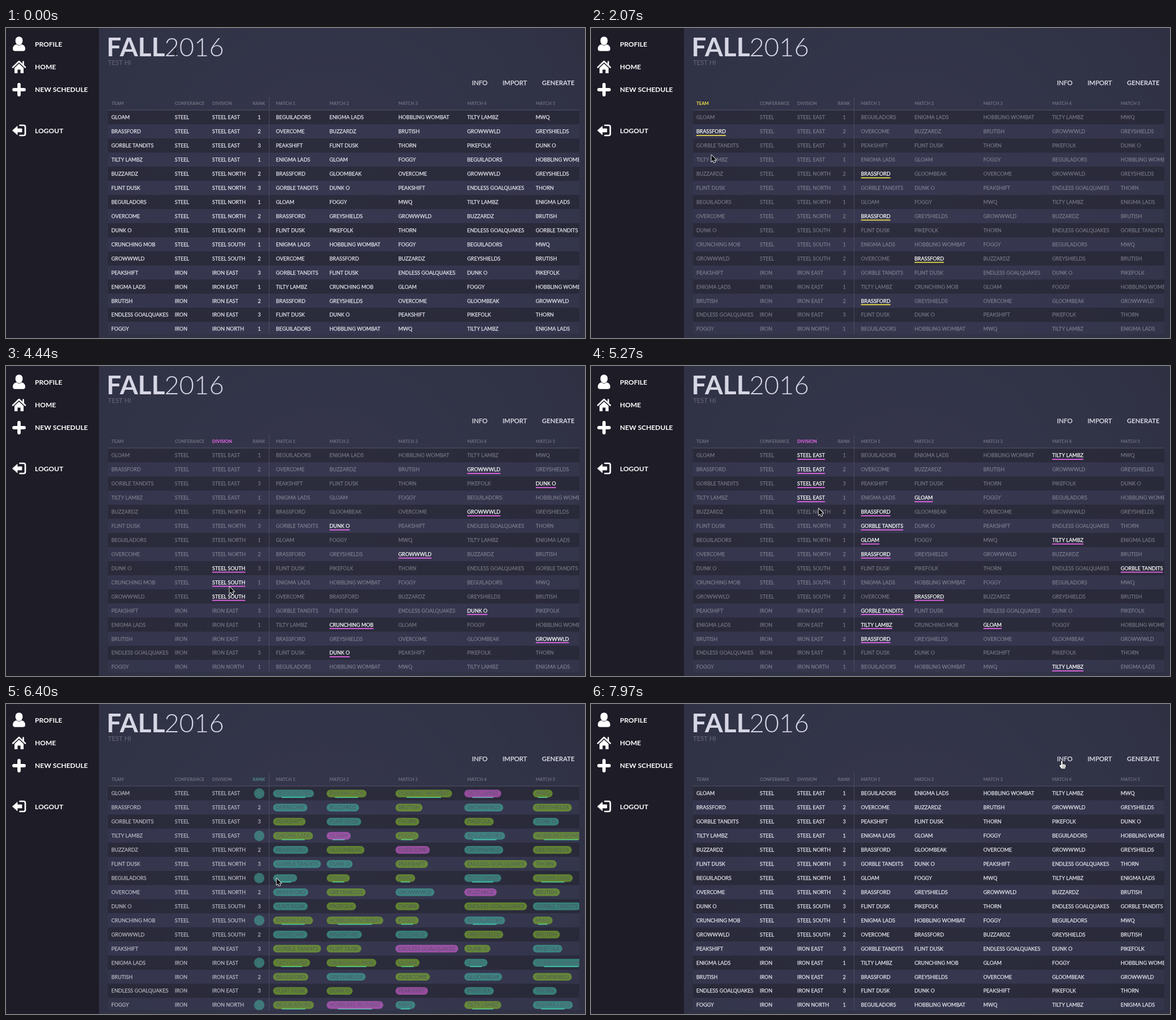
An HTML page with a canvas that plays this animation: 1022 px wide and 548 px high, repeating every 8000 ms.

```html
<!DOCTYPE html>
<html lang="en">
<head>
<meta charset="utf-8">
<title>Season schedule</title>
<style>
html, body { margin: 0; width: 100%; height: 100%; overflow: hidden; background: #2f3043; }
canvas { display: block; width: 1022px; height: 548px; }
</style>
</head>
<body>
<canvas id="stage" width="1022" height="548"></canvas>
<script>
const ctx = document.getElementById('stage').getContext('2d');
const LOOP = 8000, TOP = 158, ROW = 24.93, RIGHT = 1012, BOTTOM = 541;
const INK = '#e4e4ed', DARK = '#303145', DIM = 0.34;
const COLORS = { team: '#efe24e', conf: '#92d22f', div: '#ee68ee', rank: '#47c9b0' };
const PILLS = { division: '#f069ee', conference: '#45c5ae', outside: '#8fcb2c' };
const MATCH_X = [476.5, 571, 692.5, 814, 935];

// name, conference, division, rank, five opponents
const rows = `
GLOAM,STEEL,EAST,1,BEGUILADORS,ENIGMA LADS,HOBBLING WOMBAT,TILTY LAMBZ,MWQ
BRASSFORD,STEEL,EAST,2,OVERCOME,BUZZARDZ,BRUTISH,GROWWWLD,GREYSHIELDS
GORBLE TANDITS,STEEL,EAST,3,PEAKSHIFT,FLINT DUSK,THORN,PIKEFOLK,DUNK O
TILTY LAMBZ,STEEL,EAST,1,ENIGMA LADS,GLOAM,FOGGY,BEGUILADORS,HOBBLING WOMBAT
BUZZARDZ,STEEL,NORTH,2,BRASSFORD,GLOOMBEAK,OVERCOME,GROWWWLD,GREYSHIELDS
FLINT DUSK,STEEL,NORTH,3,GORBLE TANDITS,DUNK O,PEAKSHIFT,ENDLESS GOALQUAKES,THORN
BEGUILADORS,STEEL,NORTH,1,GLOAM,FOGGY,MWQ,TILTY LAMBZ,ENIGMA LADS
OVERCOME,STEEL,NORTH,2,BRASSFORD,GREYSHIELDS,GROWWWLD,BUZZARDZ,BRUTISH
DUNK O,STEEL,SOUTH,3,FLINT DUSK,PIKEFOLK,THORN,ENDLESS GOALQUAKES,GORBLE TANDITS
CRUNCHING MOB,STEEL,SOUTH,1,ENIGMA LADS,HOBBLING WOMBAT,FOGGY,BEGUILADORS,MWQ
GROWWWLD,STEEL,SOUTH,2,OVERCOME,BRASSFORD,BUZZARDZ,GREYSHIELDS,BRUTISH
PEAKSHIFT,IRON,EAST,3,GORBLE TANDITS,FLINT DUSK,ENDLESS GOALQUAKES,DUNK O,PIKEFOLK
ENIGMA LADS,IRON,EAST,1,TILTY LAMBZ,CRUNCHING MOB,GLOAM,FOGGY,HOBBLING WOMBAT
BRUTISH,IRON,EAST,2,BRASSFORD,GREYSHIELDS,OVERCOME,GLOOMBEAK,GROWWWLD
ENDLESS GOALQUAKES,IRON,EAST,3,FLINT DUSK,DUNK O,PEAKSHIFT,PIKEFOLK,THORN
FOGGY,IRON,NORTH,1,BEGUILADORS,HOBBLING WOMBAT,MWQ,TILTY LAMBZ,ENIGMA LADS
HOBBLING WOMBAT,IRON,NORTH,1
MWQ,IRON,SOUTH,1
GLOOMBEAK,IRON,SOUTH,2
GREYSHIELDS,IRON,SOUTH,2
THORN,IRON,SOUTH,3
PIKEFOLK,IRON,SOUTH,3`.trim().split('\n').map(line => {
  const [team, conf, area, rank, ...matches] = line.split(',');
  return { team, conf, div: conf + ' ' + area, rank, matches };
});
const teams = Object.fromEntries(rows.map(r => [r.team, r]));
const shown = rows.filter(r => r.matches.length);

const states = [
  [-1000, 'none'],
  [1640, 'team', 'BRASSFORD'],
  [2230, 'team', 'TILTY LAMBZ'],
  [2680, 'conf', 'STEEL'],
  [3660, 'div', 'STEEL NORTH'],
  [4060, 'div', 'STEEL SOUTH'],
  [4640, 'div', 'STEEL NORTH'],
  [4980, 'div', 'STEEL EAST'],
  [5640, 'rank', '1'],
  [6320, 'pills'],
  [7690, 'none']
].map(([at, kind, value]) => ({ at, kind, value }));

// time, x, y of the pointer
const path = [
  [0, 299, 43], [300, 299, 43], [600, 262, 74], [1000, 205, 140], [1300, 194, 172],
  [1570, 194, 172], [1800, 203, 186], [2070, 212, 224], [2390, 216, 236],
  [2630, 216, 236], [3040, 316, 244], [3310, 316, 244], [3580, 382, 267],
  [4000, 392, 360], [4270, 394, 390], [4440, 394, 390], [5000, 397, 290],
  [5450, 404, 226], [5660, 428, 262], [5830, 444, 292], [6200, 449, 303],
  [6580, 502, 312], [6720, 502, 312], [6980, 534, 325], [7250, 534, 325],
  [7400, 640, 205], [7580, 772, 92], [7720, 806, 81], [7970, 831, 101], [8000, 831, 101]
];

const clamp = v => Math.max(0, Math.min(1, v));
const lerp = (a, b, k) => a + (b - a) * k;

// A hairline stroke thickens small regular text without changing its width.
function text(str, x, y, size, { weight = 400, color = INK, alpha = 1, align = 'left' } = {}) {
  if (alpha <= 0) return;
  const baseline = y + size * 0.36;
  ctx.font = `${weight} ${size}px Lato, sans-serif`;
  ctx.textAlign = align;
  ctx.fillStyle = ctx.strokeStyle = color;
  ctx.globalAlpha = alpha;
  ctx.fillText(str, x, baseline);
  if (weight === 400) {
    ctx.lineWidth = 0.25;
    ctx.lineJoin = 'round';
    ctx.strokeText(str, x, baseline);
  }
  ctx.globalAlpha = 1;
}

function rect(x, y, w, h, color) {
  ctx.fillStyle = color;
  ctx.fillRect(x, y, w, h);
}

function shape(d, fill, stroke, width = 1) {
  const p = new Path2D(d);
  if (stroke) {
    ctx.strokeStyle = stroke;
    ctx.lineWidth = width;
    ctx.lineJoin = ctx.lineCap = 'round';
    ctx.stroke(p);
  }
  if (fill) {
    ctx.fillStyle = fill;
    ctx.fill(p);
  }
}

function drawBackground() {
  const glow = ctx.createRadialGradient(560, 270, 40, 560, 270, 560);
  glow.addColorStop(0, '#35364c');
  glow.addColorStop(0.6, '#313347');
  glow.addColorStop(1, '#2f3042');
  rect(0, 0, 1022, 548, glow);
}

function drawSidebar() {
  rect(0, 0, 164, 548, '#1d1c27');
  const W = '#ffffff';
  shape('M23 15.3C27 15.3 29.4 18.4 29.4 22.4C29.4 26.6 26.6 30.2 23 30.2C19.4 30.2 16.6 26.6 16.6 22.4C16.6 18.4 19 15.3 23 15.3Z', W);
  shape('M12 37C12 31.4 15.6 29.5 18.4 29Q23 33 27.6 29C30.4 29.5 34 31.4 34 37Q34 40.7 30 40.7H16Q12 40.7 12 37Z', W);
  shape('M12 69.5L23 59L34 69.5M30.5 59.5V65', null, W, 2.6);
  shape('M15 70.5L23 63L31 70.5V80H25.6V73.5H20.4V80H15Z', W);
  shape('M23 100V118M14 109H32', null, W, 5.8);
  shape('M24.5 172H31Q34 172 34 175V187Q34 190 31 190H24.5', null, W, 2.7);
  shape('M11.5 181L20 173.5V178H28V184H20V188.5Z', W, W, 0.8);
  [['PROFILE', 28.5], ['HOME', 69], ['NEW SCHEDULE', 109], ['LOGOUT', 181.2]]
    .forEach(([label, y]) => text(label, 51, y, 12, { weight: 700, color: W }));
}

function drawHeading() {
  text('FALL', 177.6, 33.4, 46, { weight: 700, color: '#d6d6e4' });
  text('2016', 279.4, 33.4, 45.4, { weight: 300, color: '#d6d6e4' });
  text('TEST HI', 180, 61.2, 11.3, { color: '#5f6073' });
  text('INFO', 822.6, 97.2, 11.4);
  text('IMPORT', 876.4, 97.2, 11.4);
  text('GENERATE', 1003.5, 97.2, 11.3, { weight: 700, align: 'right', color: '#d9d9e6' });
}

const isFilter = state => state.kind in COLORS;

const isLit = (state, column, team) => isFilter(state) &&
  (column === state.kind || column === 'match') && team[state.kind] === state.value;

const brightness = (state, column, team) =>
  !isFilter(state) || isLit(state, column, team) ? 1 : DIM;

function underline(state, x, y, width, grow) {
  if (grow <= 0) return;
  rect(x + width * (1 - grow) / 2, y + 6, width * grow, 1.7, COLORS[state.kind]);
}

function drawPill(row, rival, x, y, width, alpha) {
  const kind = row.div === rival.div ? 'division' : row.conf === rival.conf ? 'conference' : 'outside';
  ctx.globalAlpha = alpha;
  ctx.fillStyle = PILLS[kind];
  ctx.beginPath();
  ctx.roundRect(x - 5, y - 6.8, width + 10, 13.6, 6.8);
  ctx.fill();
  text(rival.team, x, y, 9, { color: DARK, alpha });
}

function drawRank(label, x, y, alpha, disc) {
  text(label, x, y, 9, { align: 'center', alpha: alpha * (1 - disc) });
  if (disc <= 0) return;
  ctx.globalAlpha = disc;
  ctx.fillStyle = COLORS.rank;
  ctx.beginPath();
  ctx.arc(x, y, 9.2, 0, Math.PI * 2);
  ctx.fill();
  text(label, x, y, 9, { align: 'center', color: DARK, alpha: disc });
}

function drawCell(view, column, row, team, label, x, y) {
  const { prev, cur, mix, grow } = view;
  const alpha = lerp(brightness(prev, column, team), brightness(cur, column, team), mix);
  const wasLit = isLit(prev, column, team), lit = isLit(cur, column, team);

  if (column === 'rank') {
    drawRank(label, x, y, alpha, lerp(wasLit ? 1 : 0, lit ? 1 : 0, mix));
    return;
  }

  const pill = column === 'match'
    ? lerp(prev.kind === 'pills' ? 1 : 0, cur.kind === 'pills' ? 1 : 0, mix) : 0;
  text(label, x, y, 9, { color: lit ? '#ffffff' : INK, alpha: alpha * (1 - pill) });
  ctx.font = '400 9px Lato, sans-serif';
  const width = ctx.measureText(label).width;
  if (wasLit) underline(prev, x, y, width, 1 - grow);
  if (lit) underline(cur, x, y, width, grow);
  if (pill > 0) drawPill(row, team, x, y, width, pill);
}

function drawHeader(view) {
  const label = (str, x, kind, align) => {
    const style = { weight: 700, align };
    const glow = lerp(view.prev.kind === kind ? 1 : 0, view.cur.kind === kind ? 1 : 0, view.mix);
    text(str, x, 133, 7.8, { ...style, alpha: 0.34 * (1 - glow) });
    text(str, x, 133, 7.8, { ...style, color: COLORS[kind], alpha: glow });
  };
  label('TEAM', 186, 'team');
  label('CONFERANCE', 298, 'conf');
  label('DIVISION', 364, 'div');
  label('RANK', 446.5, 'rank', 'center');
  MATCH_X.forEach((x, i) => label('MATCH ' + (i + 1), x, 'match'));
}

function drawTable(t) {
  let i = states.length - 1;
  while (states[i].at > t) i--;
  const cur = states[i], prev = states[Math.max(0, i - 1)];
  const view = { cur, prev, mix: clamp((t - cur.at) / 150), grow: clamp((t - cur.at) / 250) };

  ctx.save();
  ctx.beginPath();
  ctx.rect(180, 115, RIGHT - 180, BOTTOM - 115);
  ctx.clip();
  shown.forEach((_, n) => rect(180, TOP + (n - 0.5) * ROW, RIGHT - 180, ROW,
    n % 2 ? 'rgba(59,59,86,.45)' : 'rgba(38,37,50,.6)'));
  rect(180, 144.5, RIGHT - 180, 1, '#505165');
  rect(464, 122, 1, BOTTOM - 122, '#4b4c60');
  drawHeader(view);
  shown.forEach((row, n) => {
    const y = TOP + n * ROW + 0.2;
    drawCell(view, 'team', row, row, row.team, 186, y);
    drawCell(view, 'conf', row, row, row.conf, 298, y);
    drawCell(view, 'div', row, row, row.div, 364, y);
    drawCell(view, 'rank', row, row, row.rank, 447, y);
    row.matches.forEach((name, m) => drawCell(view, 'match', row, teams[name], name, MATCH_X[m], y));
  });
  ctx.restore();
}

function drawPointer(t) {
  const i = path.findIndex(p => p[0] > t);
  const [t0, x0, y0] = path[i - 1], [t1, x1, y1] = path[i];
  const k = (t - t0) / (t1 - t0);
  ctx.save();
  ctx.translate(lerp(x0, x1, k), lerp(y0, y1, k));
  if (t < 420) {
    shape('M-2.5 -6Q0 -6 0 -4Q0 -6 2.5 -6M0 -4V5M-2.5 7Q0 7 0 5Q0 7 2.5 7M-1.5 2H1.5', null, '#16161d', 1);
  } else if (t > 7880) {
    shape('M-1.2 7V1Q-1.2 -.4 0 -.4Q1.2 -.4 1.2 1V5Q2 4.2 3.2 5.2Q4.4 4.6 5.2 5.8Q7 5.4 7 7.4V9.5L5.6 13.2H-.6L-4 8.6Q-4.6 7 -3 6.8Z', '#ffffff', '#111118', 1.6);
    shape('M1.2 5V7M3.2 5.4V7.2M5.2 6V7.5M1 9V11.5M3 9V11.5M5 9V11.5', null, '#111118', 0.6);
  } else {
    shape('M.5 .5V12.2L3.2 9.7L5 13.8L7.1 12.9L5.4 9H9Z', '#0c0c11', '#ffffff', 1.7);
  }
  ctx.restore();
}

function frame(now) {
  const t = now % LOOP;
  drawBackground();
  drawSidebar();
  drawHeading();
  drawTable(t);
  drawPointer(t);
  requestAnimationFrame(frame);
}
requestAnimationFrame(frame);
</script>
</body>
</html>
```
